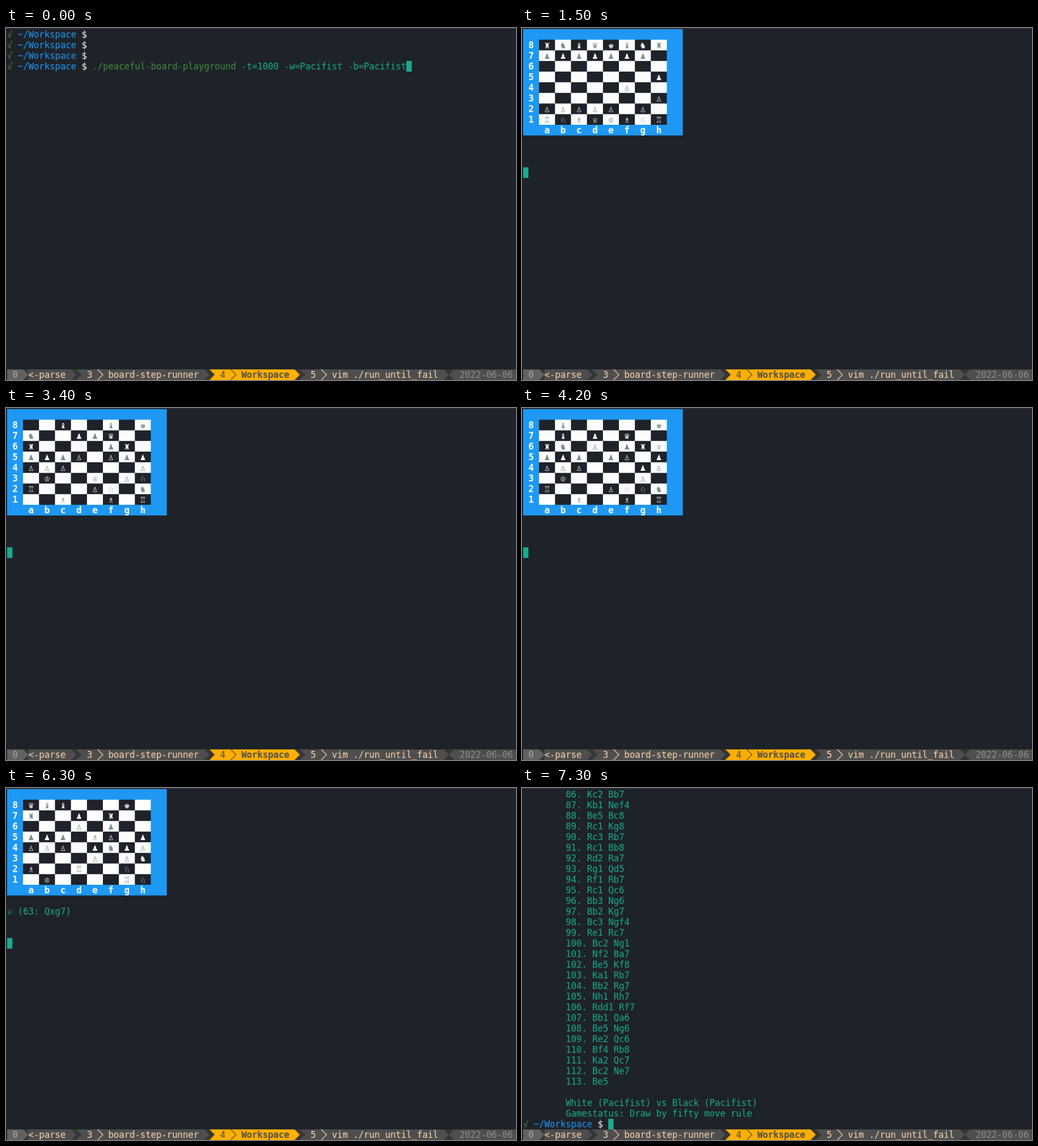
An HTML page with a canvas for the animation above (8 s loop, 900 px wide and 622 px high).

```html
<!DOCTYPE html>
<html lang="en">
<head>
<meta charset="utf-8">
<title>Terminal chess</title>
<style>
  html, body { margin: 0; width: 100%; height: 100%; overflow: hidden; background: #1e2229; }
  canvas { display: block; width: 900px; height: 622px; }
</style>
</head>
<body>
<canvas id="screen" width="958" height="662"></canvas>
<script>
// The terminal is drawn on a whole-pixel grid of cells; CSS scales it to the stage.
const canvas = document.getElementById('screen');
const ctx = canvas.getContext('2d');
const LOOP = 8000, BOARD_START = 1400, LOG_START = 7300;
const CELL_W = 10, CELL_H = 20, PAD = 2, BASELINE = 16;
const BG = '#1e2229', WHITE = '#fdfdfd', BLUE = '#1e98f3', GREEN = '#448c3b', TEAL = '#1aab8c',
      GRAY = '#7c8986', BAR = '#363636', TAB = '#4e4e4e', CREAM = '#ffd7af', AMBER = '#ffaf00';
const FILES = 'abcdefgh';
const STATUS_ROW = 32;

// Moves by squares up to move 85, then in chess notation.
const opening = `
  f2f4 h7h5 h2h3
  a7a5 d2d4 b7b5 d4d5 b8c6 b1c3 a8a6 d1d3 c6a7 c3d1 a6e6 d3c3 c7c5 b2b4 f7f6 c2c4
  g7g5 g2g3 g8h6 h3h4 f8g7 g1f3 g7f8 f3g1 c8b7 c1e3 b7c8 e3c1 e8f7 f4f5 d8e8 e1d2
  e6a6 a2a4 h6g4 a1a2 g4h2 d1f2 h8h6 c3e3 h6g6 d2c2 f7g8 c2b3 e8f7 g1h3 g8h8
  h3f4 e7e5 f4g2 f8d6 h1g1 d6b8 g1h1 g5g4 c1b2 c8b7 b2c1 a7c8 d5d6 c8b6 e3h6
  e2e3 e5e4 c1d2 b6d5 d2e1 d5f4 f1d3 h2f3 d3b1 a6b6 a2d2
  b7a6 d2d5 b3c2 h6g7 f7g7 h1g1 g7h6 f2h1 g6g8 g8f8 h8g8
  e1c3 b8a7 b1a2 f3g5 c2b2 g5h3 h1f2 f4e6 f2h1 g8g7 d5d4 f8f7 d4d5 h6h8 g1f1 h8a8 f1g1
`.trim().split(/\s+/);
const FIRST_LOGGED = 86;
const logged = `
  Kc2 Bb7 Kb1 Nef4 Be5 Bc8 Rc1 Kg8 Rc3 Rb7 Rc1 Bb8 Rd2 Ra7 Rg1 Qd5 Rf1 Rb7 Rc1 Qc6
  Bb3 Ng6 Bb2 Kg7 Bc3 Ngf4 Re1 Rc7 Bc2 Ng1 Nf2 Ba7 Be5 Kf8 Ka1 Rb7 Bb2 Rg7 Nh1 Rh7
  Rdd1 Rf7 Bb1 Qa6 Be5 Ng6 Re2 Qc6 Bf4 Rb8 Ka2 Qc7 Bc2 Ne7 Be5
`.trim().split(/\s+/);

// [time, moves played by then]
const pace = [[1400, 0], [1500, 3], [2400, 32], [2500, 32], [2600, 35], [4200, 65],
              [5000, 87], [5900, 104], [6300, 119], [7300, 157]];

function startBoard() {
  const board = {};
  [...FILES].forEach((f, i) => {
    board[f + 1] = 'RNBQKBNR'[i];
    board[f + 2] = 'P';
    board[f + 7] = 'p';
    board[f + 8] = 'rnbqkbnr'[i];
  });
  return board;
}

function reaches(board, kind, from, to) {
  const x = FILES.indexOf(from[0]), y = +from[1];
  const dx = FILES.indexOf(to[0]) - x, dy = to[1] - y;
  const far = Math.max(Math.abs(dx), Math.abs(dy));
  const straight = dx * dy === 0, diagonal = Math.abs(dx) === Math.abs(dy);
  if (kind === 'N') return Math.abs(dx * dy) === 2;
  if (kind === 'K') return far === 1;
  if (!(kind !== 'B' && straight || kind !== 'R' && diagonal)) return false;
  for (let i = 1; i < far; i++) {
    if (board[FILES[x + dx / far * i] + (y + dy / far * i)]) return false;
  }
  return true;
}

function resolve(board, move, white) {
  const kind = move[0], to = move.slice(-2), file = move.slice(1, -2);
  const piece = white ? kind : kind.toLowerCase();
  const from = Object.keys(board).find(sq =>
    board[sq] === piece && sq.startsWith(file) && reaches(board, kind, sq, to));
  return [from, to];
}

function play(board, from, to) {
  const next = { ...board, [to]: board[from] };
  delete next[from];
  return next;
}

const positions = [startBoard()];
const latest = () => positions[positions.length - 1];
opening.forEach(m => positions.push(play(latest(), m.slice(0, 2), m.slice(2))));
logged.forEach((m, i) => positions.push(play(latest(), ...resolve(latest(), m, i % 2 === 0))));

const colX = col => PAD + col * CELL_W;
const rowY = row => PAD + row * CELL_H;

function cells(col, row, width, height, color) {
  ctx.fillStyle = color;
  ctx.fillRect(colX(col), rowY(row), width * CELL_W, height * CELL_H);
}

function text(col, row, string, color, bold = false) {
  ctx.font = `${bold ? 'bold ' : ''}17px "DejaVu Sans Mono", monospace`;
  ctx.fillStyle = color;
  [...string].forEach((ch, i) => {
    if (ch !== ' ') ctx.fillText(ch, colX(col + i), rowY(row) + BASELINE);
  });
}

const cursor = (col, row) => cells(col, row, 1, 1, TEAL);

function prompt(row) {
  text(0, row, '√', GREEN);
  text(2, row, '~/Workspace', BLUE);
  text(14, row, '$', WHITE);
}

function arrowPath(fromCol, toCol) {
  const top = rowY(STATUS_ROW);
  ctx.beginPath();
  ctx.moveTo(colX(fromCol), top);
  ctx.lineTo(colX(toCol), top + CELL_H / 2);
  ctx.lineTo(colX(fromCol), top + CELL_H);
}

function arrow(fromCol, toCol, color) {
  arrowPath(fromCol, toCol);
  ctx.fillStyle = color;
  ctx.fill();
}

function chevron(col, color) {
  arrowPath(col, col + 1);
  ctx.strokeStyle = color;
  ctx.lineWidth = 1.3;
  ctx.stroke();
}

function tab(col, end, number, name, active) {
  const fill = active ? AMBER : TAB, ink = active ? TAB : CREAM;
  cells(col, STATUS_ROW, end - col, 1, fill);
  arrow(col, col + 1, BAR);
  arrow(end, end + 1, fill);
  text(col + 2, STATUS_ROW, number, ink);
  chevron(col + 4, ink);
  text(col + 6, STATUS_ROW, name, ink, active);
}

function statusBar() {
  cells(0, STATUS_ROW, 96, 1, BAR);
  cells(0, STATUS_ROW, 3, 1, '#626262');
  arrow(3, 4, '#626262');
  text(1, STATUS_ROW, '0', '#a8a8a8');
  cells(4, STATUS_ROW, 8, 1, TAB);
  arrow(12, 13, TAB);
  text(4, STATUS_ROW, '<-parse', CREAM);
  tab(13, 37, '3', 'board-step-runner');
  tab(38, 54, '4', 'Workspace', true);
  tab(55, 82, '5', 'vim ./run_until_fail');
  cells(84, STATUS_ROW, 12, 1, TAB);
  arrow(84, 83, TAB);
  text(85, STATUS_ROW, '2022-06-06', '#8f8f8f');
}

function drawCommand() {
  for (let row = 0; row < 4; row++) prompt(row);
  text(16, 3, './peaceful-board-playground', GREEN);
  text(44, 3, '-t=1000 -w=Pacifist -b=Pacifist', TEAL);
  cursor(75, 3);
}

function drawBoard(board) {
  cells(0, 0, 30, 10, BLUE);
  for (let row = 1; row <= 8; row++) {
    const rank = 9 - row;
    text(1, row, String(rank), WHITE, true);
    [...FILES].forEach((file, i) => {
      const dark = (i + row) % 2 === 1, piece = board[file + rank];
      cells(3 + 3 * i, row, 3, 1, dark ? BG : WHITE);
      if (piece) {
        const glyph = String.fromCharCode(0x2654 + 'KQRBNPkqrbnp'.indexOf(piece));
        text(4 + 3 * i, row, glyph, dark ? WHITE : GRAY);
      }
    });
  }
  text(4, 9, [...FILES].join('  '), WHITE, true);
  const captured = Object.keys(board).length < 32;
  if (captured) text(0, 11, '♕ (63: Qxg7)', TEAL);
  cursor(0, captured ? 14 : 13);
}

function drawLog() {
  for (let i = 0; i < logged.length; i += 2) {
    const pair = logged.slice(i, i + 2).join(' ');
    text(8, i / 2, `${FIRST_LOGGED + i / 2}. ${pair}`, TEAL);
  }
  text(8, 29, 'White (Pacifist) vs Black (Pacifist)', TEAL);
  text(8, 30, 'Gamestatus: Draw by fifty move rule', TEAL);
  prompt(31);
  cursor(16, 31);
}

function movesPlayed(time) {
  const i = pace.findIndex(([end]) => end > time);
  const [t0, n0] = pace[i - 1], [t1, n1] = pace[i];
  return Math.round(n0 + (n1 - n0) * (time - t0) / (t1 - t0));
}

function draw(now) {
  const time = Math.floor(now % LOOP / 100) * 100;
  ctx.fillStyle = BG;
  ctx.fillRect(0, 0, canvas.width, canvas.height);
  ctx.fillStyle = '#33373c';
  ctx.fillRect(0, 0, canvas.width, 1);
  if (time < BOARD_START) drawCommand();
  else if (time < LOG_START) drawBoard(positions[movesPlayed(time)]);
  else drawLog();
  statusBar();
}

const began = performance.now();
function tick() {
  draw(performance.now() - began);
  requestAnimationFrame(tick);
}
tick();
</script>
</body>
</html>
```
